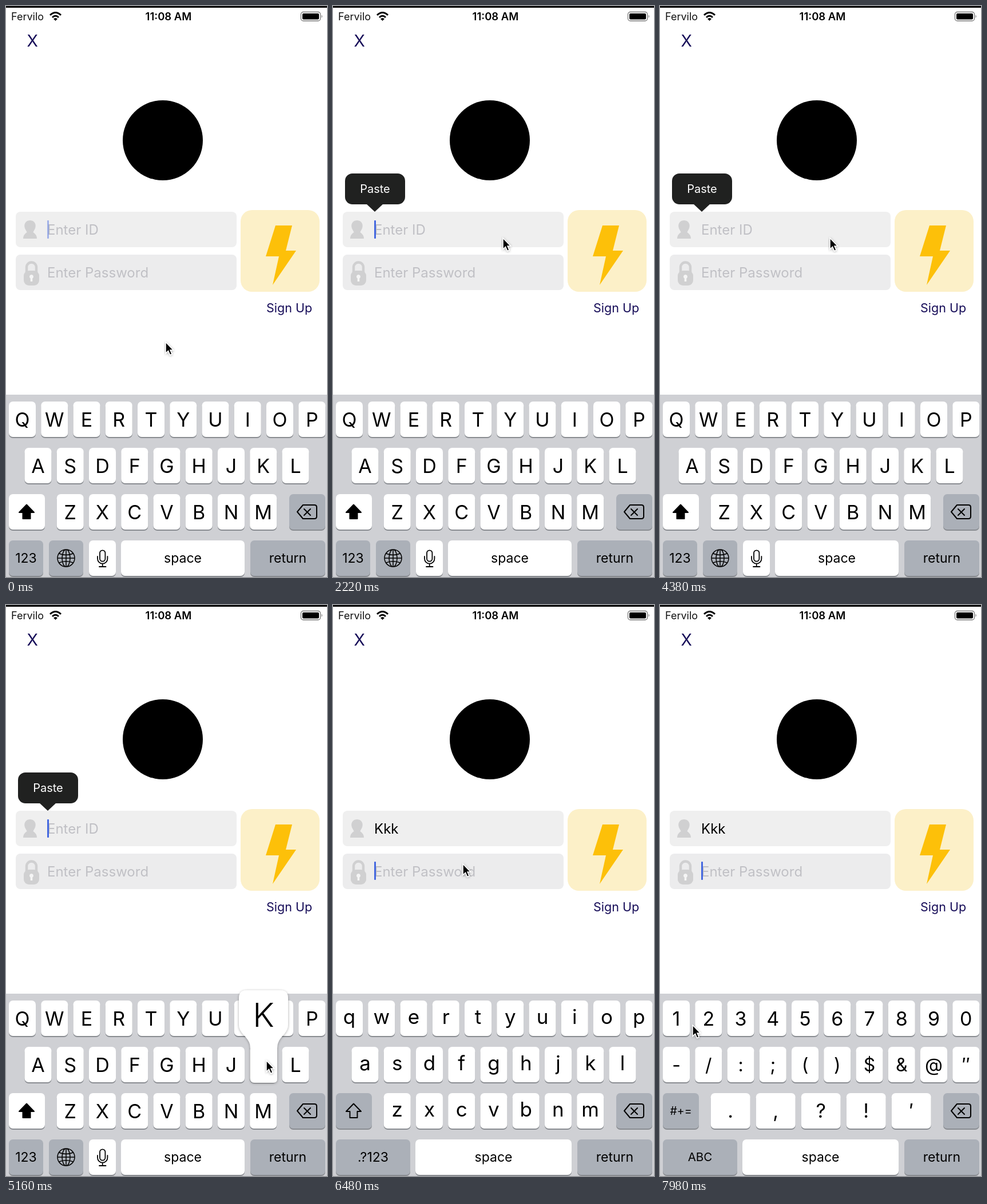
An HTML page that plays this animation: 561 by 999 pixels, repeating every 8000 ms.

```html
<!DOCTYPE html>
<html lang="en">
<head>
<meta charset="utf-8">
<title>Sign-in screen</title>
<style>
  html, body { margin: 0; width: 100%; height: 100%; overflow: hidden; background: #fff; }
  svg { display: block; width: 561px; height: 999px; }
  text { font-family: Inter, Roboto, sans-serif; white-space: pre; }
  .icon { fill: none; stroke: #000; stroke-width: 2; stroke-linejoin: round; stroke-linecap: round; }
</style>
</head>
<body>
<svg id="stage" viewBox="0 0 561 999"></svg>
<script>
const LOOP = 8000, STEP = 60;
const NAVY = '#160c58', HINT = '#c0c0c5', GRAY_KEY = '#abb0b8';

const text = (x, y, size, label, fill = '#000', extra = '') =>
  `<text x="${x}" y="${y}" font-size="${size}" fill="${fill}" ${extra}>${label}</text>`;
const centered = (x, y, size, label, extra = '') =>
  text(x, y, size, label, '#000', `text-anchor="middle" ${extra}`);
const box = (x, y, w, h, r, fill) =>
  `<rect x="${x}" y="${y}" width="${w}" height="${h}" rx="${r}" fill="${fill}"/>`;
const icon = (d, extra = '') => `<path class="icon" d="${d}" ${extra}/>`;
const group = (id, content) => `<g id="${id}">${content}</g>`;

// Keyboard
const key = (x, y, w, fill = '#fff') =>
  box(x, y + 2, w, 62, 7, '#898c91') + box(x, y, w, 62, 7, fill);
const labelKey = (x, y, w, label, size, fill) =>
  key(x, y, w, fill) + centered(x + w / 2, y + 31 + size * .36, size, label);
const keyRow = (chars, x, y, baseline, size, w = 47, pitch = 56.25) =>
  [...chars].map((c, i) => key(x + i * pitch, y, w) +
    centered(x + i * pitch + w / 2, y + baseline, size, c)).join('');

const deleteKey = key(495, 854, 63, GRAY_KEY) +
  icon('M519 873H539Q543 873 543 877V893Q543 897 539 897H519L509 885ZM521 880L532 891M532 880L521 891');
const returnKey = labelKey(427, 935, 131, 'return', 23, GRAY_KEY);
const shiftKey = (fill, arrowFill) => key(5, 854, 63, fill) +
  icon('M36 872.5L49 886H42.5V897H29.5V886H23Z', `style="fill:${arrowFill}"`);
const letters = (rows, baseline, size) =>
  keyRow(rows[0], 5, 692, baseline, size) +
  keyRow(rows[1], 32.5, 773, baseline, size) +
  keyRow(rows[2], 88.7, 854, baseline, size);

const globe = key(75, 935, 60, GRAY_KEY) +
  icon('M90 966a15 15 0 1 0 30 0a15 15 0 1 0-30 0M98 966a7 15 0 1 0 14 0a7 15 0 1 0-14 0M105 951V981M90 966H120M93 958Q105 963 117 958M93 974Q105 969 117 974',
    'style="stroke-width:1.5"');
const mic = key(145, 935, 47) +
  icon('M164 957a4.7 4.7 0 0 1 9.4 0V967a4.7 4.7 0 0 1-9.4 0ZM160 963V967a8.7 8.7 0 0 0 17.4 0V963M168.7 976V981M163 981H174.5',
    'style="stroke-width:1.8"');
const plainBottom = labelKey(5, 935, 60, '123', 23, GRAY_KEY) + globe + mic +
  labelKey(201, 935, 216, 'space', 23);
const secureBottom = label =>
  labelKey(5, 935, 130, label, label === 'ABC' ? 20.5 : 23, GRAY_KEY) +
  labelKey(144, 935, 273, 'space', 23);

const upper = letters(['QWERTYUIOP', 'ASDFGHJKL', 'ZXCVBNM'], 44, 34) + shiftKey('#fff', '#000');
const lower = letters(['qwertyuiop', 'asdfghjkl', 'zxcvbnm'], 41, 35) + shiftKey(GRAY_KEY, 'none');
const symbols = keyRow('1234567890', 5, 692, 44, 34) +
  keyRow('-/:;()$&@″', 5, 773, 43, 32).replace('>&<', '>&amp;<') +
  keyRow('.,?!′', 88.7, 854, 43, 34, 69, 79) +
  labelKey(5, 854, 63, '#+=', 19.5, GRAY_KEY) + secureBottom('ABC');

const keyPopup = `<path filter="url(#soft)" fill="#fff" d="M421 674H479Q493 674 493 688V733
  C493 752 474 755 474 775V829Q474 836 467 836H434Q427 836 427 829V775
  C427 755 407 752 407 733V688Q407 674 421 674Z"/>` +
  centered(450, 738, 58, '', 'id="popupLetter" font-weight="300"');

// Screen
const statusBar = box(0, 0, 561, 3, 0, '#000') +
  text(9, 25, 18, 'Fervilo', '#111') +
  `<g fill="none" stroke="#000" stroke-width="3">
    <path d="M77 16Q86.500 7 96 16M81 20Q86.500 14.500 92 20"/></g>
  <path d="M83 22.500Q86.500 19.500 90 22.500L86.500 26Z"/>` +
  centered(284, 25, 18.5, '11:08 AM', 'font-weight="600"') +
  `<rect x="515.500" y="10.500" width="34" height="15.500" rx="4" fill="none" stroke="#777" stroke-width="1.300"/>
  <path d="M551.500 15.500Q554 18.200 551.500 21Z" fill="#777"/>` +
  box(518, 13, 29, 10.5, 2, '#000');

const fields = box(17, 360, 386, 62, 8, '#efefef') + box(17, 435, 386, 62, 8, '#ececed') +
  `<path fill="#d0d0d1" d="M42 375C51 375 54 384 50 391Q48 394 47.500 396Q54 400 54 407H30Q30 400 36.500 396
    Q36 394 34 391C30 384 33 375 42 375Z"/>
  <path fill="none" stroke="#d0d0d1" stroke-width="4.500" d="M36 468V457a8.500 8.500 0 0 1 17 0V468"/>` +
  box(31, 463, 27, 26, 9, '#d0d0d1') +
  `<path fill="#f5f5f5" d="M44.500 470a3.500 3.500 0 0 1 1.800 6.500V482H42.700V476.500A3.500 3.500 0 0 1 44.500 470Z"/>` +
  text(72, 400, 24, 'Enter ID', HINT, 'id="idText"') +
  text(72, 475, 24, 'Enter Password', HINT);

const signIn = box(410, 357, 138, 143, 20, '#fcf0c8') +
  '<path fill="#fdc009" d="M471 384H500L489 428H507L466 488L477 438H454Z"/>' +
  text(455, 536, 21.5, 'Sign Up', NAVY);

const pasteMenu = box(21, 293, 105, 54, 13, '#202120') +
  '<path fill="#202120" d="M58 346H88L73 360Z"/>' +
  text(73.5, 327, 20, 'Paste', '#fff', 'text-anchor="middle"');

document.getElementById('stage').innerHTML = `
  <defs>
    <filter id="soft" x="-20%" y="-20%" width="140%" height="140%">
      <feDropShadow dx="0" dy="1" stdDeviation="2" flood-opacity=".35"/></filter>
  </defs>` +
  box(0, 0, 561, 999, 0, '#fff') + statusBar +
  text(36.5, 71, 28.5, 'X', NAVY) +
  '<circle cx="274" cy="235" r="70" fill="#000"/>' +
  fields + signIn +
  '<rect id="caret" width="3" height="32" rx="1" fill="#4468e0"/>' +
  group('paste', pasteMenu) +
  box(0, 680, 561, 319, 0, '#cfd0d4') +
  group('upper', upper) + group('lower', lower) +
  group('plainBottom', plainBottom) + group('secureBottom', secureBottom('.?123')) +
  group('symbols', symbols) + deleteKey + returnKey + group('popup', keyPopup) +
  `<path id="pointer" filter="url(#soft)" stroke="#fff" stroke-width="1.500"
    d="M0 0V19.500L4.500 15.300L7.700 22.500L11 21L8 14H13.500Z"/>`;

// Motion
const $ = id => document.getElementById(id);
const clamp = v => Math.max(0, Math.min(1, v));
const show = (id, on) => $(id).setAttribute('display', on ? 'inline' : 'none');

const pointerPath = [
  [0, 279, 588], [300, 279, 588], [1100, 366, 471], [1400, 366, 471], [1900, 297, 406],
  [4500, 297, 406], [5000, 455, 797], [5860, 455, 797], [6360, 227, 453], [6560, 227, 453],
  [7260, 80, 967], [7620, 80, 967], [7920, 57, 735], [LOOP, 57, 735]
];
const presses = [[5100, 5280], [5400, 5520], [5640, 5760]];
const PASTE_AT = 2040, PASSWORD_AT = 6360, SYMBOLS_AT = 7440;

function pointerAt(t) {
  const i = pointerPath.findIndex(p => p[0] > t);
  const [t0, x0, y0] = pointerPath[i - 1], [t1, x1, y1] = pointerPath[i];
  const u = (t - t0) / (t1 - t0), k = u * u * (3 - 2 * u);
  return [x0 + (x1 - x0) * k, y0 + (y1 - y0) * k];
}

function caretOpacity(t) {
  const start = t >= PASSWORD_AT ? PASSWORD_AT : t >= 5280 ? 5760 : 12;
  if (start === 5760 && t < start) return 1;
  const p = ((t - start) / 1100 + 1) % 1;
  return p > .98 ? (p - .98) / .02 : clamp((.85 - p) / .13);
}

function render(t) {
  const typed = 'Kkk'.slice(0, presses.filter(p => t >= p[1]).length);
  const pressed = presses.findIndex(p => t >= p[0] && t < p[1]);
  const inPassword = t >= PASSWORD_AT, inSymbols = t >= SYMBOLS_AT;

  $('idText').textContent = typed || 'Enter ID';
  $('idText').setAttribute('fill', typed ? '#000' : HINT);

  const caretX = typed && !inPassword ? 73 + $('idText').getComputedTextLength() : 72;
  $('caret').setAttribute('x', caretX);
  $('caret').setAttribute('y', inPassword ? 449 : 375);
  $('caret').setAttribute('opacity', caretOpacity(t));

  show('paste', t >= PASTE_AT && !typed);
  $('paste').setAttribute('opacity', clamp((t - PASTE_AT + STEP) / 180));

  show('upper', !typed);
  show('lower', typed && !inSymbols);
  show('plainBottom', !inPassword);
  show('secureBottom', inPassword && !inSymbols);
  show('symbols', inSymbols);
  show('popup', pressed >= 0);
  $('popupLetter').textContent = pressed > 0 ? 'k' : 'K';

  $('pointer').setAttribute('transform', `translate(${pointerAt(t)})`);
}

const origin = performance.now();
function tick() {
  const t = (performance.now() - origin) % LOOP;
  render(Math.floor(t / STEP) * STEP);
  requestAnimationFrame(tick);
}
tick();
</script>
</body>
</html>
```
